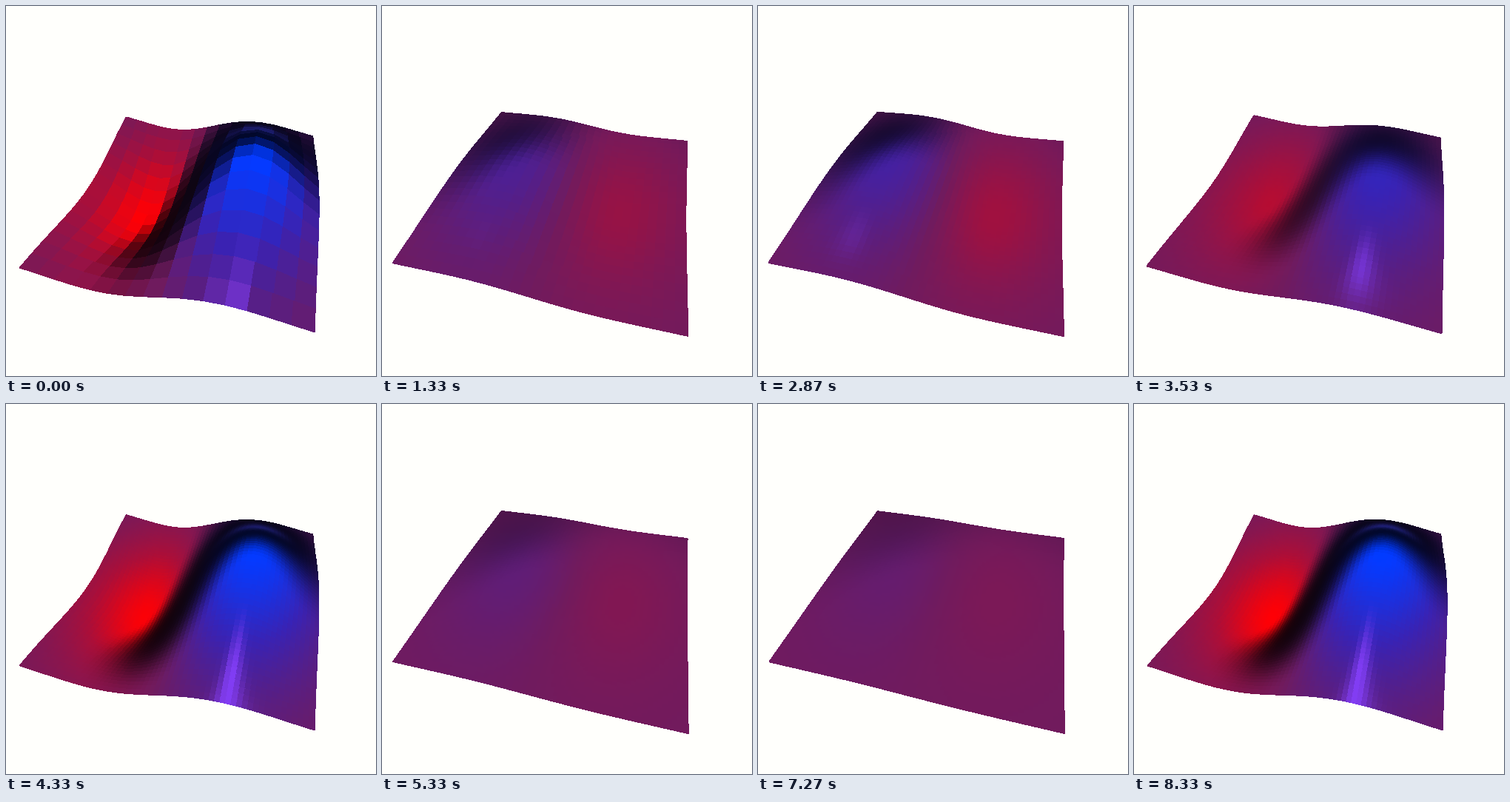
A matplotlib script that plays this animation: 500x500 px, repeating every 8390 ms.

```python
import numpy as np
import matplotlib.pyplot as plt
from matplotlib.animation import FuncAnimation
from matplotlib.collections import PolyCollection

SIZE, FRAMES, LOOP = 500, 126, 8390
AMP, PEAK, DECAY = 0.535, 0.476, 1.5

# Camera looking at the origin
FOCAL, DIST = 450.5, 2.848
AZ, EL = np.radians(14.18), np.radians(45)
EYE = DIST * np.array([np.cos(EL) * np.sin(AZ), -np.cos(EL) * np.cos(AZ), np.sin(EL)])
LAMP = np.array([0.6, -2, 1.4])

# Lit colour by relative height
LEVELS = [-1, -0.5, 0, 0.5, 1]
RED = [255, 172, 112, 58, 0]
GREEN = [0, 14, 27, 34, 60]
BLUE = [5, 56, 94, 178, 262]


def smooth(lo, hi, v):
    s = np.clip((v - lo) / (hi - lo), 0, 1)
    return s * s * (3 - 2 * s)


def height(x, y, a):
    s = x / PEAK
    return a * s * np.exp((1 - s * s) / 2 - DECAY * y * y)


def project(x, y, z):
    side = x * np.cos(AZ) + y * np.sin(AZ)
    away = y * np.cos(AZ) - x * np.sin(AZ)
    depth = DIST + away * np.cos(EL) - z * np.sin(EL)
    up = away * np.sin(EL) + z * np.cos(EL)
    return SIZE / 2 + FOCAL * side / depth, SIZE / 2 - FOCAL * up / depth, depth


def facing(n, p, target):
    d = target - p
    return (n * d).sum(-1) / np.linalg.norm(d, axis=-1)


def shade(x, y, a):
    z = height(x, y, a)
    s = x / PEAK
    zx = a / PEAK * (1 - s * s) * np.exp((1 - s * s) / 2 - DECAY * y * y)
    zy = -2 * DECAY * y * z
    p = np.stack([x, y, z], -1)
    n = np.stack([-zx, -zy, np.ones_like(x)], -1)
    n /= np.linalg.norm(n, axis=-1, keepdims=True)

    h = z / AMP
    lit = 0.15 + 0.85 * smooth(0, 0.55, facing(n, p, LAMP))
    r = np.interp(h, LEVELS, RED) * lit ** 1.2
    g = np.interp(h, LEVELS, GREEN) * lit
    b = np.interp(h, LEVELS, BLUE) * lit ** 0.9
    rgb = np.stack([r, g, b], -1)

    # Bright crease on the near end of the ridge, thin rim on the far end
    crease = np.exp(-(zx / 0.09) ** 2) * smooth(-0.4, -0.85, y) * smooth(0.15, 0.35, zy)
    rgb += 0.9 * crease[..., None] * (np.array([135, 65, 255]) - rgb)
    rim = np.exp(-(facing(n, p, EYE) / 0.11) ** 2) * smooth(0.1, 0.6, y) * (h > 0)
    rgb += rim[..., None] * np.array([40, 40, 130])
    return np.clip(rgb / 255, 0, 1)


fig = plt.figure(figsize=(5, 5), dpi=100, facecolor="#fffffc")
ax = fig.add_axes([0, 0, 1, 1])
ax.set_xlim(0, SIZE)
ax.set_ylim(SIZE, 0)
ax.axis("off")
sheet = PolyCollection([], linewidths=0.6, antialiaseds=False)
sheet.set_snap(False)
ax.add_collection(sheet, autolim=False)


def draw(k):
    a = AMP * np.cos(0.1 * k)
    cells = min(15 + int(0.7 * k), 66)  # the mesh gets finer as time passes
    line = np.linspace(-1, 1, cells + 1)
    x, y = np.meshgrid(line, line)
    u, v, _ = project(x, y, height(x, y, a))
    pts = np.stack([u, v], -1)
    quads = np.stack([pts[:-1, :-1], pts[:-1, 1:], pts[1:, 1:], pts[1:, :-1]], 2)

    mid = (line[1:] + line[:-1]) / 2
    cx, cy = np.meshgrid(mid, mid)
    depth = project(cx, cy, height(cx, cy, a))[2].ravel()
    order = np.argsort(-depth)
    colors = shade(cx, cy, a).reshape(-1, 3)[order]
    sheet.set_verts(quads.reshape(-1, 4, 2)[order])
    sheet.set_facecolor(colors)
    sheet.set_edgecolor(colors)
    return [sheet]


anim = FuncAnimation(fig, draw, frames=FRAMES, interval=LOOP / FRAMES,
                     repeat=True, repeat_delay=0, blit=False)
plt.show()
```
